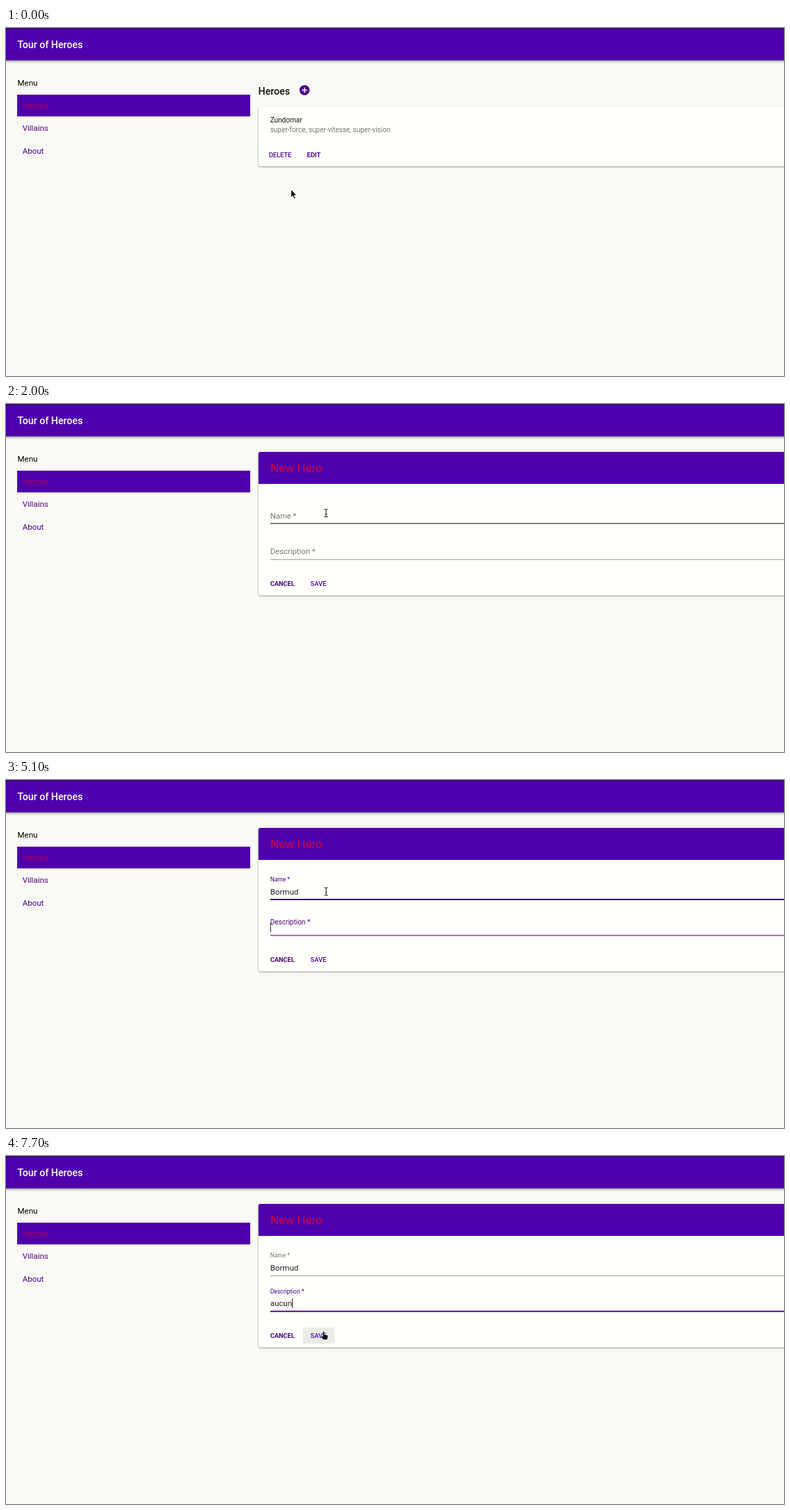
These frames come from a looping animation (1118 by 501 pixels, 8 s). An HTML page:

```html
<!DOCTYPE html>
<html lang="en">
<head>
<meta charset="utf-8">
<title>Tour of Heroes</title>
<style>
  html, body { margin: 0; height: 100%; overflow: hidden; background: #f9faf5; }
  svg { display: block; width: 1118px; height: 501px; font: 11.5px Roboto, sans-serif; }
  .title { font-size: 14.2px; font-weight: 500; }
  .small { font-size: 10px; }
  .button { font-size: 9.25px; font-weight: 500; fill: #4e00a4; }
  .bold { font-weight: 700; }
  .link { fill: #4b0082; }
  .bar { fill: #4e00ac; }
  .paper { fill: #fffffb; }
  .card { filter: drop-shadow(0 1px 1px rgba(0,0,0,.4)); }
  .input { fill: #222; }
  .label { font-size: 11.3px; }
  .list { font: 9.1px "Noto Sans", sans-serif; fill: #222; }
  .short { font: 9.2px "Liberation Sans", sans-serif; }
</style>
</head>
<body>
<svg viewBox="0 0 1118 501">
  <rect class="bar" x="-9" width="1136" height="46.5" style="filter:drop-shadow(0 1px 2px rgba(0,0,0,.5))"/>
  <rect width="1118" height="2" fill="#3b0c78"/>
  <text class="title" x="16.5" y="28.7" fill="#fff">Tour of Heroes</text>
  <text x="16.5" y="83">Menu</text>
  <rect class="bar" x="16" y="96" width="335" height="31.3"/>
  <text x="23.7" y="115.5" fill="#b0004c">Heroes</text>
  <text class="link" x="23.7" y="148.3">Villains</text>
  <text class="link" x="23.7" y="181.2">About</text>

  <g id="listPage">
    <text class="title" x="362.6" y="96" fill="#111">Heroes</text>
    <circle id="add" cx="429" cy="89.5" r="7.3"/>
    <path d="M425.2 89.5h7.6M429 85.7v7.6" stroke="#fff" stroke-width="1.5"/>
    <rect class="paper card" x="362.7" y="113" width="780" height="86" rx="3"/>
    <text class="small" x="379.7" y="135.6" fill="#111">Zundomar</text>
    <text class="small" x="379.7" y="149.7" fill="#777">super-force, super-vitesse, super-vision</text>
    <rect id="deleteHover" x="367" y="170" width="54" height="24" rx="2" fill="#ecebef"/>
    <text class="button" x="377.7" y="185.5">DELETE</text>
    <text class="button bold" x="432.6" y="185.5">EDIT</text>
  </g>

  <g id="formPage">
    <rect class="paper card" x="362.7" y="69" width="780" height="206.5" rx="3"/>
    <path class="bar" d="M362.7 115V72q0-3 3-3H1118V115z"/>
    <text x="379.7" y="98.3" fill="#d0003e" style="font-size:17.2px">New Hero</text>
    <g id="fields"></g>
    <rect id="saveHover" x="426.5" y="247" width="45.5" height="23" rx="2" fill="#ebebe7"/>
    <text class="button bold link" x="379.7" y="262">CANCEL</text>
    <text class="button" x="437.6" y="262">SAVE</text>
    <rect id="caret" width="1" height="13.5" fill="#222"/>
    <g id="nameList" class="list">
      <rect class="paper card" x="379.7" y="173" width="154.3" height="115" rx="2"/>
      <text x="388.6" y="195">a</text>
      <text x="388.6" y="221">mov</text>
      <text x="388.6" y="247">brownharvestelk_noreply</text>
      <text x="388.6" y="273">j</text>
    </g>
    <g id="descList" class="list short">
      <rect class="paper card" x="379.7" y="225" width="51" height="87" rx="2"/>
      <text x="389.5" y="248">a</text>
      <text x="389.5" y="272.5">aa</text>
      <text x="389.5" y="297.5">aaa</text>
    </g>
  </g>

  <g id="cursor" stroke-linejoin="round">
    <path id="arrow" d="M0 0V11.5L2.7 9 4.8 13.6 6.6 12.8 4.6 8.3H8.2z" stroke="#fff" stroke-width=".8"/>
    <path id="hand" d="M-1.3 1Q0-.6 1.2 1V4.4L6 5.6V8.6L5 12H-.6L-4.2 7.6Q-4 6-2.6 6.6L-1.3 7.6z" stroke="#fff" stroke-width=".6"/>
    <path id="beam" d="M-2.6-5.5H-1Q0-5.5 0-4.5 0-5.5 1-5.5H2.6M-2.6 5.5H-1Q0 5.5 0 4.5 0 5.5 1 5.5H2.6M0-4.5V4.5M-1.3 1.5H1.3" fill="none" stroke="#111"/>
  </g>
</svg>
<script>
const LOOP = 8000, STEP = 100, LEFT = 379.7;
const $ = id => document.getElementById(id);
const show = (id, on) => $(id).style.display = on ? "" : "none";

// Latest value of a [time, value, time, value, ...] list
function at(t, list, value = 0) {
  for (let i = 0; i < list.length && list[i] <= t; i += 2) value = list[i + 1];
  return value;
}

function makeField(title, y) {
  const g = document.createElementNS("http://www.w3.org/2000/svg", "g");
  g.innerHTML = `<text class="label">${title} *</text><text class="input" x="${LEFT}" y="${y}"></text>
    <rect x="${LEFT}" y="${y + 7}" width="740" height="1" fill="#919191"/>
    <rect x="${LEFT}" y="${y + 6.3}" width="740" fill="#222"/>
    <rect x="${LEFT}" y="${y + 6.3}" width="740" height="1.8" fill="#4b0082"/>`;
  $("fields").append(g);
  const [label, input, , hoverLine, focusLine] = g.children;
  return { y, input, draw(text, lift, focus, hover) {
    label.setAttribute("transform", `translate(${LEFT} ${y - 18.6 * lift}) scale(${1 - lift / 4})`);
    label.setAttribute("fill", focus > .4 ? "#4b0082" : "#777");
    input.textContent = text;
    hoverLine.setAttribute("height", hover < 1 ? 1.3 : 1.8);
    hoverLine.setAttribute("opacity", hover);
    focusLine.setAttribute("opacity", focus);
  } };
}
const nameField = makeField("Name", 164.8), descField = makeField("Description", 216.4);

// Pointer moves: start, end, control point, end point
const moves = [
  [500, 1200, 350, 175, 425.5, 95.5],
  [1400, 2100, 460, 130, 460, 160.5],
  [6900, 7100, 430, 118, 419, 148],
  [7200, 7400, 432, 180, 446, 215],
  [7500, 7700, 454, 235, 456.5, 252.5]
];
function pointer(t) {
  let x = 409.5, y = 232.5;
  for (const [start, end, cx, cy, ex, ey] of moves) {
    if (t <= start) break;
    const k = Math.min(1, (t - start) / (end - start)), p = k * k * (3 - 2 * k);
    const curve = (a, b, c) => (1 - p) ** 2 * a + 2 * p * (1 - p) * b + p * p * c;
    x = curve(x, cx, ex);
    y = curve(y, cy, ey);
  }
  return [x, y];
}

function draw(now) {
  const t = Math.floor(now % LOOP / STEP) * STEP;
  const form = t >= 1500, [x, y] = pointer(t);

  const onAdd = !form && Math.hypot(x - 429, y - 89.5) < 10;
  const onDelete = !form && x > 367 && x < 421 && y > 170 && y < 194;
  const onSave = form && x > 427 && y > 240;
  const onName = form && y > 150 && y < 172;
  show("listPage", !form);
  show("formPage", form);
  show("deleteHover", onDelete);
  show("saveHover", onSave);
  $("add").setAttribute("fill", onAdd ? "#d9000f" : "#4b0082");

  const hand = onAdd || onDelete || onSave;
  show("hand", hand);
  show("beam", onName);
  show("arrow", !hand && !onName);
  $("cursor").setAttribute("transform", `translate(${x} ${y})`);

  const nameLift = at(t, [2300, .45, 2400, .93, 2700, 1]);
  const descLift = at(t, [5100, .45, 5200, .93, 5400, 1]);
  const name = "Bormud".slice(0, at(t, [2700, 1, 2900, 2, 3100, 3, 3800, 4, 4200, 6]));
  const desc = "aucun".slice(0, at(t, [5700, 1, 5900, 2, 6200, 4, 6400, 5]));
  nameField.draw(name, nameLift, nameLift * (1 - descLift), onName ? at(t, [0, .6, 2100, 1]) : 0);
  descField.draw(desc, descLift, descLift, 0);

  const active = t < 5100 ? nameField : descField;
  const length = active.input.textContent ? active.input.getComputedTextLength() : 0;
  $("caret").setAttribute("x", LEFT + length);
  $("caret").setAttribute("y", active.y - 10.8);
  show("caret", at(t, [2300, 1, 3700, 0, 3800, 1, 4900, 0, 5100, 1, 7000, 0, 7600, 1]));

  $("nameList").setAttribute("opacity", at(t, [2400, 1, 2800, .5, 2900, .1, 3100, 0]));
  $("descList").setAttribute("opacity", at(t, [5700, 1, 5800, .5, 5900, .12, 6200, 0]));
  requestAnimationFrame(draw);
}
requestAnimationFrame(draw);
</script>
</body>
</html>
```
